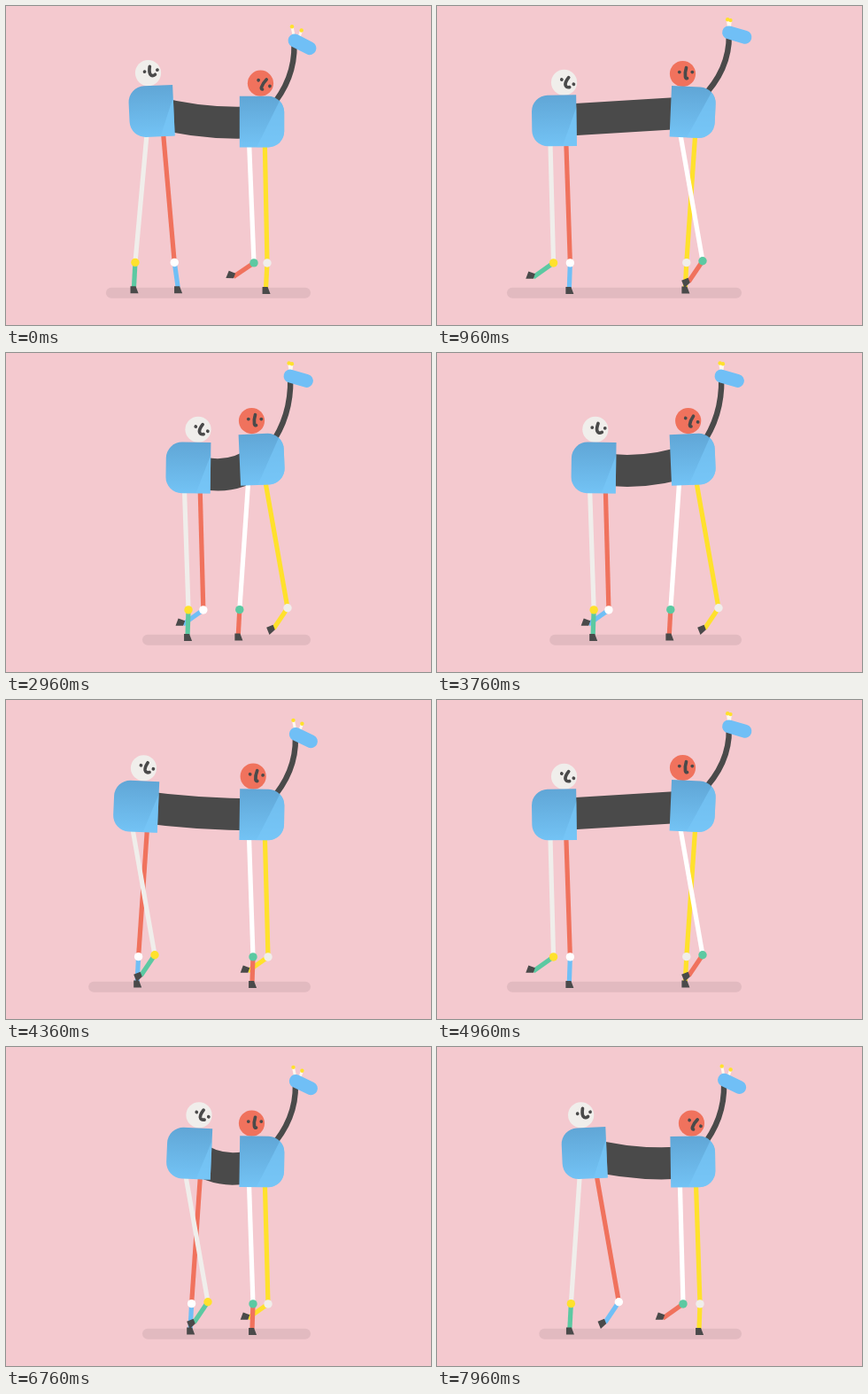
Recreate the animation shown at these times as an HTML page with a canvas. Size 480 by 360 pixels, loop 8 s.

```html
<!DOCTYPE html>
<html lang="en">
<head>
<meta charset="utf-8">
<title>Walking creature</title>
<style>
  html, body { margin: 0; width: 100%; height: 100%; overflow: hidden; background: #f4c9cf; }
  canvas { display: block; width: 480px; height: 360px; }
</style>
</head>
<body>
<canvas id="stage" width="480" height="360"></canvas>
<script>
const ctx = document.getElementById('stage').getContext('2d');
const TAU = Math.PI * 2, RAD = Math.PI / 180;
const DARK = '#4a4a4a', RED = '#f0725d', YELLOW = '#ffe12c', GREEN = '#5cc9a2',
      BLUE = '#70bff6', WHITE = '#fff', CREAM = '#f0eeeb';
const STRIDE = 800, TRIP = 4000, LOOK = 2000, HIP_Y = 140, THIGH = 150;

// Stride keys: [phase, knee offset from hip, shin angle in degrees]
const GAIT = [
  [200, 13, -8], [280, 9, 0], [400, 3, 3], [600, -13.5, 3],
  [760, 4, 55], [800, 6, 56], [960, 26, 34], [1000, 13, -8]
];

const mix = (a, b, u) => a + (b - a) * u;
const ease = (t, from, to) => {
  const u = Math.min(1, Math.max(0, (t - from) / (to - from)));
  return (1 - Math.cos(Math.PI * u)) / 2;
};
const bob = t => Math.cos(TAU * t / (STRIDE / 2));
const sway = t => Math.sin(TAU * t / STRIDE);
const bodyY = t => 124.7 + 5.9 * bob(t);

function gait(t) {
  const p = (t + 2 * STRIDE - 200) % STRIDE + 200;
  const i = GAIT.findIndex(k => k[0] > p);
  const a = GAIT[i - 1], b = GAIT[i], u = (p - a[0]) / (b[0] - a[0]);
  return [mix(a[1], b[1], u), mix(a[2], b[2], u)];
}

function placed(x, y, deg, draw) {
  ctx.save();
  ctx.translate(x, y);
  ctx.rotate(deg * RAD);
  draw();
  ctx.restore();
}

function dot(x, y, r, color) {
  ctx.fillStyle = color;
  ctx.beginPath();
  ctx.arc(x, y, r, 0, TAU);
  ctx.fill();
}

function line(path, width, color, cap = 'butt') {
  ctx.strokeStyle = color;
  ctx.lineWidth = width;
  ctx.lineCap = cap;
  ctx.stroke(new Path2D(path));
}

function leg(hipX, t, thigh, knee, shin) {
  const [dx, angle] = gait(t);
  const x = hipX + dx, y = HIP_Y + Math.sqrt(THIGH * THIGH - dx * dx);
  line(`M${hipX},${HIP_Y}L${x},${y}`, 5.2, thigh);
  placed(x, y, angle, () => {
    line('M0,0V28', 5.2, shin);
    placed(0, 27.5, angle > 10 ? angle : -angle, () => {
      ctx.fillStyle = DARK;
      ctx.fill(new Path2D('M-4,-.5H2L5,7.5H-4Z'));
    });
  });
  dot(x, y, 4.7, knee);
}

function body(x, y, deg, side) {
  placed(x, y, deg, () => {
    const fill = ctx.createLinearGradient(0, -29, 0, 29);
    fill.addColorStop(0, '#60a6d6');
    fill.addColorStop(1, '#73c3f5');
    ctx.beginPath();
    ctx.roundRect(-25.2, -28.8, 50.4, 57.6, side > 0 ? [0, 18, 18, 0] : [18, 0, 0, 18]);
    ctx.fillStyle = fill;
    ctx.fill();
    ctx.clip();
    ctx.fillStyle = 'rgba(120,200,249,.65)';
    ctx.fill(new Path2D(side > 0 ? 'M23,-29.5L-6,29H30V-29Z' : 'M26,-17L9,29H30V-17Z'));
  });
}

function face(x, y, deg, color, nose) {
  dot(x, y, 14.6, color);
  placed(x, y, deg, () => {
    dot(-3.7, -2, 1.9, DARK);
    dot(10.8, -2, 1.9, DARK);
    line(nose, 3.7, DARK, 'round');
  });
}

function neckAndHead(t, by) {
  const c = bob(t), s = sway(t), h = (1 + c) / 2;
  const x = 334.5 + 4.5 * s, y = 36.3 + 7 * c + 2 * s;
  const endX = x - 9, endY = y;
  line(`M298,${by - 15}Q${endX + 1},${by - 48} ${endX},${endY}`, 6.4, DARK);
  const horn = (bx, topX, topY) => {
    line(`M${x + bx},${y - 8}L${x + topX},${y + topY}`, 3, '#fff8ee');
    dot(x + topX, y + topY, 2.2, YELLOW);
  };
  horn(-9, mix(-10.5, -11.5, h), mix(-17, -20, h));
  horn(mix(-9, -3.5, h), mix(-8, -.8, h), mix(-16.5, -15.8, h));
  placed(x, y, 21 + 6 * c, () => line('M-9.5,0H9.5', 15, BLUE, 'round'));
}

function draw(time) {
  const t = time % TRIP, cycle = (t + 3000) % TRIP;   // cycle starts at the widest stretch
  const rearT = t + 200;
  const hip = 127.5 + 74.5 * (ease(cycle, 0, 1640) - ease(cycle, 1800, 4000));
  const shade = 79 + 75 * (ease(cycle, 0, 1200) - ease(cycle, 1960, 3920));
  const rearX = hip + 4.8, rearY = bodyY(rearT), frontX = 289, frontY = bodyY(t);

  const look = (t + 20) % LOOK;
  const turn = ease(look, 0, 520) - ease(look, LOOK - 520, LOOK);

  ctx.fillStyle = '#f4c9cf';
  ctx.fillRect(0, 0, 480, 360);
  line(`M${shade + 6},323.8H338`, 12, '#e2bac0', 'round');

  // Belly hangs lower as the two halves come together
  const sag = Math.max(0, 157 - (frontX - rearX)) * .33;
  line(`M${rearX},${rearY}Q${(rearX + frontX) / 2},${(rearY + frontY) / 2 + sag} ${frontX},${frontY}`, 36, DARK);
  neckAndHead(t, frontY);

  leg(hip + 17.8, rearT, RED, WHITE, BLUE);
  leg(hip, rearT + 400, CREAM, YELLOW, GREEN);
  leg(292, t + 400, YELLOW, CREAM, YELLOW);
  leg(274, t, WHITE, GREEN, RED);

  face(hip + 1 + 15 * turn, rearY - 43.2, -8 + 29 * turn, CREAM, 'M2.8,-7Q1,-1 2.2,1.8Q4,5 7.6,2.8');
  face(287.5 - 10 * turn, frontY - 43.4, 28 - 28 * turn, RED, 'M4,-6.8Q2.2,-1 3,3.5Q3.5,5.5 5,5');

  body(rearX, rearY, -2.6 * sway(rearT), -1);
  body(frontX, frontY, 2.6 * sway(t), 1);
}

const start = performance.now();
function tick() {
  draw(Math.floor((performance.now() - start) / 40) * 40);
  requestAnimationFrame(tick);
}
tick();
</script>
</body>
</html>
```
